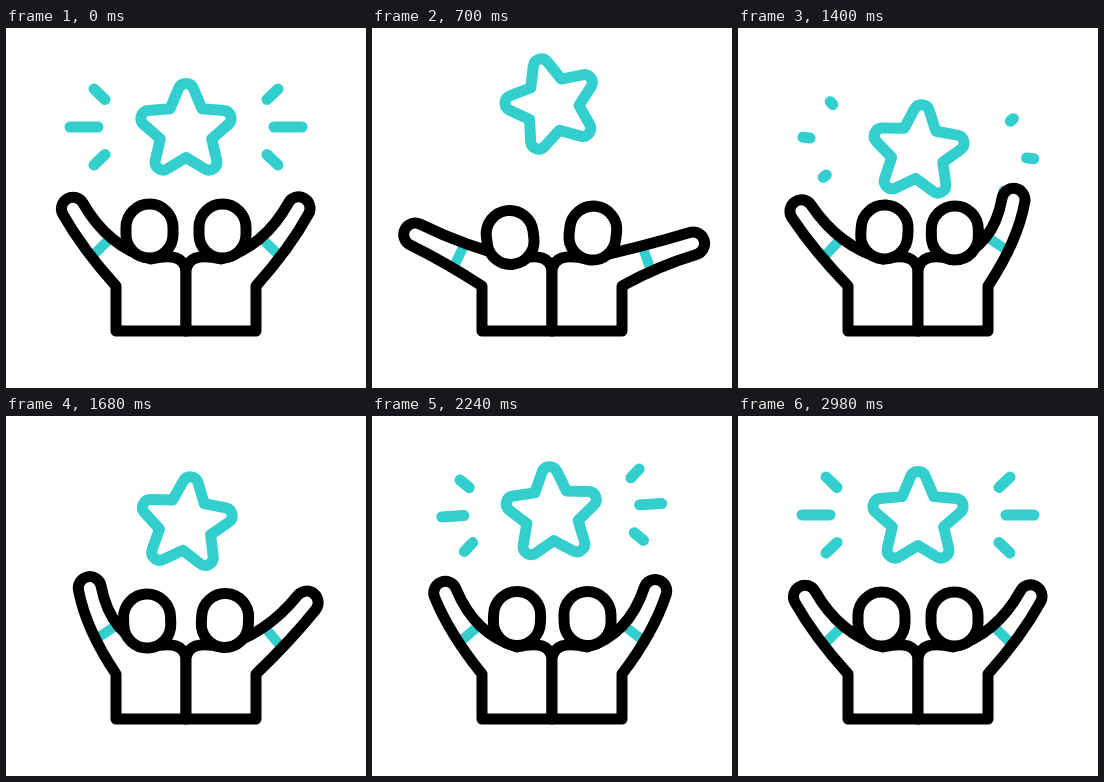
Write an HTML page with a canvas that moves like this. It is 360 by 360 pixels and loops after 3000 ms.

```html
<!DOCTYPE html>
<html lang="en">
<head>
<meta charset="utf-8">
<title>Cheering friends</title>
<style>
html, body { margin: 0; width: 100%; height: 100%; overflow: hidden; background: #fff; }
canvas { display: block; width: 360px; height: 360px; }
</style>
</head>
<body>
<canvas width="360" height="360"></canvas>
<script>
const ctx = document.querySelector('canvas').getContext('2d');
const TEAL = '#33cfcf', RAD = Math.PI / 180, LOOP = 3000;

// Keys are [time, value] at the turning points of each damped swing.
const starY = [[0, 102.5], [600, 74.5], [1400, 123.5], [2000, 88], [2450, 105.5], [2900, 102.2], [3000, 102.5]];
const starTurn = [[0, 0], [720, -16], [1560, 7.3], [2230, -3.5], [2850, 1.2], [3000, 0]];
const people = [
  {
    arm: [[0, 54], [1020, 18.8], [1670, 69], [1960, 39], [2260, 60], [2500, 50], [2800, 54.5], [3000, 54]],
    x: [[0, 143.5], [650, 138], [1300, 147.2], [1750, 140.8], [2240, 145], [3000, 143.5]],
    y: [[0, 203], [680, 209.5], [1050, 202.5], [1680, 205], [2200, 202.5], [3000, 203]],
    turn: [[0, 0], [680, -7], [1300, 4.5], [1760, -2.5], [2240, 2], [3000, 0]]
  },
  {
    arm: [[0, 54.5], [600, 19], [900, 19], [1400, 69.5], [1820, 39], [2220, 63], [2600, 54], [3000, 54.5]],
    x: [[0, 143.5], [620, 138.5], [1060, 146.5], [1660, 141], [2240, 144.5], [3000, 143.5]],
    y: [[0, 203], [620, 205.5], [1000, 202], [1450, 205], [2200, 202.5], [3000, 203]],
    turn: [[0, 0], [660, -7], [1080, 4.5], [1660, -3], [2240, 1.5], [3000, 0]]
  }
];
const rays = [[81, -31, 92, -41.5], [88, -3.5, 116, -3.5], [81, 24, 92, 34.5]];

function at(keys, t) {
  const i = keys.findIndex(k => k[0] > t);
  const [t0, a] = keys[i - 1], [t1, b] = keys[i];
  return a + (b - a) * (1 - Math.cos(Math.PI * (t - t0) / (t1 - t0))) / 2;
}

const ramp = (t, from) => Math.max(0, Math.min(1, (t - from) / 380));
const along = (p, d, n) => [p[0] + d[0] * n, p[1] + d[1] * n];
const onCurve = (a, b, c, u) =>
  [0, 1].map(i => (1 - u) ** 2 * a[i] + 2 * u * (1 - u) * b[i] + u * u * c[i]);

function ink(color, width) {
  ctx.strokeStyle = color;
  ctx.lineWidth = width;
}

function line(...points) {
  ctx.beginPath();
  points.forEach(p => ctx.lineTo(...p));
  ctx.stroke();
}

function star() {
  const polar = (r, deg) => [r * Math.cos(deg * RAD), r * Math.sin(deg * RAD)];
  ctx.beginPath();
  for (let i = 0; i < 5; i++) {
    const deg = i * 72 - 90;
    ctx.lineTo(...polar(27, deg - 36));
    ctx.arcTo(...polar(59.6, deg), ...polar(27, deg + 36), 8);
  }
  ctx.closePath();
  ctx.stroke();
}

function burst(t) {
  const tail = t < 900 ? ramp(t, 200) : t < 1900 ? ramp(t, 1120) : 0;
  const head = t < 900 ? 1 : ramp(t, t < 1900 ? 920 : 1940);
  if (head <= tail) return;
  for (const side of [-1, 1])
    for (const [x0, y0, x1, y1] of rays)
      line(...[tail, head].map(u => [side * (x0 + (x1 - x0) * u), y0 + (y1 - y0) * u]));
}

function body(p, t) {
  const lift = at(p.arm, t) * RAD;
  const tilt = 1.25 * lift - 7 * RAD;
  const dir = [Math.cos(tilt), Math.sin(tilt)], side = [-dir[1], dir[0]];
  const reach = 76.5 - 4 * Math.sin(lift);
  const hand = [110 - reach * Math.cos(lift), 240 - reach * Math.sin(lift)];
  const outer = along(hand, side, 11.5), inner = along(hand, side, -11.5);
  const outerBend = along(outer, dir, 40), innerBend = along(inner, dir, 50);
  const hip = [110, 258], neck = [145, 231];

  ctx.beginPath();
  ctx.moveTo(180, 303);
  ctx.lineTo(110, 303);
  ctx.lineTo(...hip);
  ctx.quadraticCurveTo(...outerBend, ...outer);
  ctx.arc(...hand, 11.5, tilt + Math.PI / 2, tilt - Math.PI / 2);
  ctx.quadraticCurveTo(...innerBend, ...neck);
  ctx.quadraticCurveTo(178, 223, 180, 243);
  ctx.closePath();
  ctx.fill();
  ink(TEAL, 10);
  line(onCurve(outer, outerBend, hip, 0.6), onCurve(inner, innerBend, neck, 0.48));
  // The cuff was stroked with its own path, so trace the outline again.
  ctx.beginPath();
  ctx.moveTo(180, 303);
  ctx.lineTo(110, 303);
  ctx.lineTo(...hip);
  ctx.quadraticCurveTo(...outerBend, ...outer);
  ctx.arc(...hand, 11.5, tilt + Math.PI / 2, tilt - Math.PI / 2);
  ctx.quadraticCurveTo(...innerBend, ...neck);
  ctx.quadraticCurveTo(178, 223, 180, 243);
  ctx.closePath();
  ink('#000', 11);
  ctx.stroke();
}

function face(p, t) {
  ctx.translate(at(p.x, t), at(p.y, t));
  ctx.rotate(at(p.turn, t) * RAD);
  ctx.beginPath();
  ctx.arc(0, -3.5, 23.5, Math.PI, 0);
  ctx.arc(0, 3.5, 23.5, 0, Math.PI);
  ctx.closePath();
  ctx.fill();
  ctx.stroke();
}

function draw() {
  const t = performance.now() % LOOP;
  ctx.fillStyle = '#fff';
  ctx.fillRect(0, 0, 360, 360);
  ctx.lineCap = ctx.lineJoin = 'round';

  ctx.save();
  ctx.translate(180, at(starY, t));
  ctx.rotate(at(starTurn, t) * RAD);
  ink(TEAL, 11);
  star();
  burst(t);
  ctx.restore();

  for (const part of [body, face])
    people.forEach((p, i) => {
      ctx.save();
      if (i) ctx.transform(-1, 0, 0, 1, 360, 0);
      ink('#000', 11);
      part(p, t);
      ctx.restore();
    });
  requestAnimationFrame(draw);
}
draw();
</script>
</body>
</html>
```
